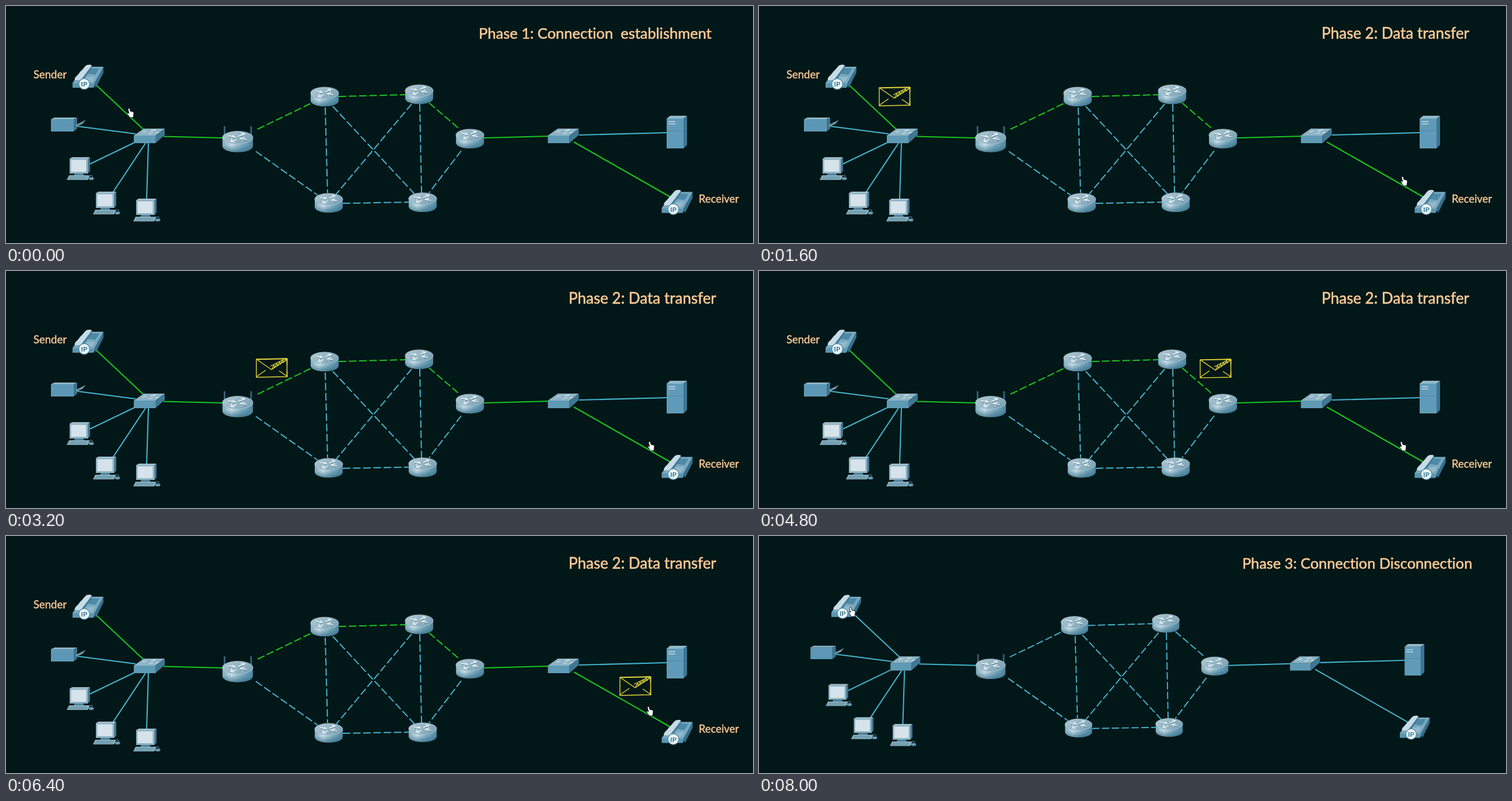
These frames come from a looping animation (1280x406 px, 8800 ms). An HTML page:

```html
<!DOCTYPE html>
<html lang="en">
<head>
<meta charset="utf-8">
<title>Connection phases</title>
<style>
  html, body { margin: 0; width: 100%; height: 100%; overflow: hidden; background: #021718; }
  svg { display: block; width: 100%; height: 100%; }
  text { font-family: Lato, "Open Sans", sans-serif; font-variant-ligatures: none; fill: #fbcb96; }
  #title, .label { stroke: #fbcb96; stroke-width: .6; }
  .label { stroke-width: .4; }
  .wire { stroke: #43b3cd; stroke-width: 2.1; fill: none; }
  .route { stroke: #18c51d; }
  .closed .route { stroke: #43b3cd; }
  .closed .label { display: none; }
  .dash { stroke-dasharray: 13 4.5; stroke-width: 2; }
  .badge { font-size: 12px; font-weight: 700; fill: #2e7796; text-anchor: middle; }
</style>
</head>
<body>
<svg viewBox="0 0 1280 406">
  <defs>
    <linearGradient id="metal">
      <stop offset="0" stop-color="#7ba9bc"/>
      <stop offset=".3" stop-color="#c9dde6"/>
      <stop offset=".65" stop-color="#78a9be"/>
      <stop offset="1" stop-color="#4f849e"/>
    </linearGradient>
    <linearGradient id="shade" x2="0" y2="1">
      <stop offset=".5" stop-color="#2f6a86" stop-opacity="0"/>
      <stop offset="1" stop-color="#2f6a86" stop-opacity=".75"/>
    </linearGradient>
    <linearGradient id="lid" x2="1" y2=".5">
      <stop offset="0" stop-color="#b3cad5"/>
      <stop offset="1" stop-color="#7fa5b7"/>
    </linearGradient>

    <g id="router">
      <path d="M-24-6V7C-24 20 24 20 24 7V-6Z" fill="url(#metal)"/>
      <path d="M-24-6V7C-24 20 24 20 24 7V-6Z" fill="url(#shade)"/>
      <ellipse cy="-6" rx="24" ry="10" fill="url(#lid)" stroke="#a9c5d1" stroke-width=".8"/>
      <g fill="none" stroke="#e6f0f3" stroke-width="1.4">
        <path d="M-15-9L-4-7M-8-10L-4-7L-11-5M14-3L4-5M8-1L4-5L11-7"/>
        <path d="M1-8L11-12M5-13L11-12L9-9M-2-3L-11 0M-5 1L-11 0L-9-4"/>
      </g>
      <path d="M-14-7L-4-5M4-3L14-1M2-6L12-10" stroke="#527f95" stroke-width=".9"/>
    </g>

    <g id="switch">
      <path d="M-27 0L-10-12H26L10 0Z" fill="#8eb4c5"/>
      <path d="M-27 0H10V13H-27Z" fill="#5f9ab5"/>
      <path d="M10 0L26-12V-1L10 13Z" fill="#3f7793"/>
      <path d="M-12-6L-5-8M-1-3L6-5M2-8L11-10M10-4L16-6" stroke="#dbe8ee" stroke-width="1.3"/>
    </g>

    <g id="phone">
      <path d="M114 132L128 111L167 105L154 132L150 140H114Z" fill="#5b96b2"/>
      <path d="M114 132L135 104L167 104L151 133Z" fill="#79a9bf"/>
      <path d="M151 133L167 104V114L154 140Z" fill="#376f8b"/>
      <path d="M139 116L147 107H160L153 118Z" fill="#4e89a6"/>
      <path d="M138 122L153 121L148 130H134Z" fill="#93b9ca"/>
      <path d="M118 127C117 123 120 121 123 118L136 103C139 100 145 100 147 102L143 110L128 127Z" fill="#c7dce6"/>
      <path d="M128 127L147 102V107L130 130Z" fill="#417b97"/>
      <circle cx="134" cy="133.500" r="9.300" fill="#f1f6f8" stroke="#5590aa" stroke-width="1.400"/>
      <text class="badge" x="134" y="138">IP</text>
    </g>

    <g id="pc">
      <path d="M109 262L113 259H144L140 262Z" fill="#a5c3d0"/>
      <path d="M140 262L144 259V283L140 287Z" fill="#3f7591"/>
      <rect x="109" y="261" width="31.500" height="26" fill="#8db2c3"/>
      <rect x="111.500" y="263.500" width="26" height="20.500" fill="#d6e3ea"/>
      <path d="M118 287H132L135 291H115Z" fill="#4d829b"/>
      <path d="M108 290H144L140 298H104Z" fill="#8bb0c0"/>
      <path d="M109 293H139M107 296H138" stroke="#4d8099" stroke-width="1"/>
      <path d="M141 291Q150 288 148 293" fill="none" stroke="#5e93ab"/>
      <ellipse cx="146" cy="295.500" rx="4.500" ry="2.600" fill="#6799af"/>
    </g>

    <g id="mail" fill="none" stroke="#e2d63c" stroke-width="1.4" stroke-linejoin="round">
      <path d="M-26-15L26-16L27 15L-26 16ZM-25-14.500L27-15.500L26 16"/>
      <path d="M-26-15L0 3L27-15M-26 15L-10 4M26 14L13 5"/>
      <path d="M-2-3L22-15M0 3L4-5L5 0L9-8L10-3L14-11L15-6L19-14L20-9L25-15" stroke-width="1.200"/>
    </g>
  </defs>

  <rect width="1280" height="406" fill="#021718"/>
  <g id="net">
    <g id="wires"></g>
    <path d="M374.500 206V226M420 206V226" stroke="#35657c" stroke-width="2.800"/>
    <use href="#router" transform="translate(397 232) scale(1.09)"/>
    <g id="parts"></g>

    <path d="M77 194L83 191H122L116 194Z" fill="#8db3c5"/>
    <path d="M77 194H116V215H77Z" fill="#5c98b5"/>
    <path d="M116 194L122 191V210L116 215Z" fill="#3c728e"/>
    <path d="M119 204L137 195L131 202L121 206Z" fill="#7599a8"/>

    <path d="M1132 193L1138 188H1167L1161 193Z" fill="#92b8c9"/>
    <path d="M1132 193H1161V244H1132Z" fill="#5f9bb8"/>
    <path d="M1161 193L1167 188V238L1161 244Z" fill="#3d7591"/>
    <path d="M1135 198H1147M1135 202H1147" stroke="#c3d9e3" stroke-width="1.400"/>
    <path d="M1132 214H1161" stroke="#4d88a4"/>

    <text class="label" x="47" y="124" font-size="18.500">Sender</text>
    <text class="label" x="1187" y="337" font-size="18.400">Receiver</text>
  </g>
  <text id="title" y="56"></text>
  <use id="letter" href="#mail"/>
  <path id="hand" d="M-2-8C-4-8-4-6-3.500-4L-2 1L-4 0C-6 0-5 2-4 3L-1 8H5L6 1C6-2 4-2 3-2L0-3L-1-7Q-1-8-2-8Z"
        fill="#fff" stroke="#071012" stroke-width=".9"/>
</svg>
<script>
const $ = id => document.getElementById(id);
const STEP = 800;

const wires = {
  "wire route": "M153 134L235 211M270 223.500L372 226M819 226L930 223M973 233L1138 327",
  "wire": "M122 206L222 219M143 271L222 233M182 321L239 235M241 330L244 235M982 221L1132 217",
  "wire route dash": "M431 211L522 167M570 155L684 152M725 166L776 210",
  "wire dash": "M428 249L534 324M547 174L551 320M560 172L700 322M695 168L566 322" +
               "M709 168L712 320M577 338L690 336M780 248L725 320"
};
$("wires").innerHTML = Object.entries(wires)
  .map(([kind, d]) => `<path class="${kind}" d="${d}"/>`).join("");

const parts = {
  router: [[546, 155], [708, 151], [553, 337], [714, 336], [795, 227]],
  switch: [[246, 222], [955.5, 222]],
  phone: [[0, 0], [1009.5, 214.5]],
  pc: [[0, 0], [45, 59], [114, 71]]
};
$("parts").innerHTML = Object.entries(parts).map(([id, spots]) =>
  spots.map(([x, y]) => `<use href="#${id}" x="${x}" y="${y}"/>`).join("")).join("");

const titles = [
  { text: "Phase 1: Connection\u00a0 establishment", x: 810, size: 25.5 },
  { text: "Phase 2: Data transfer", x: 964, size: 26 },
  { text: "Phase 3: Connection Disconnection", x: 828, size: 25.3 }
];

// One row per step: title, hand position, letter position
const steps = [
  [0, [213, 183]],
  [1, [1105, 300]],
  [1, [1105, 300], [232, 155]],
  [1, [1105, 300], [341, 194]],
  [1, [1105, 300], [455, 166]],
  [1, [1105, 300], [620, 126]],
  [1, [1103, 300], [782, 167]],
  [1, [1103, 300], [930, 191]],
  [1, [1103, 300], [1078, 257]],
  [1, [1130, 355], [1148, 378]],
  [2, [159, 130]]
];

function place(el, pos) {
  el.style.display = pos ? "" : "none";
  if (pos) el.setAttribute("transform", `translate(${pos})`);
}

function show([phase, hand, letter]) {
  const { text, x, size } = titles[phase];
  const closed = phase === 2;
  const title = $("title");
  title.textContent = text;
  title.setAttribute("x", x);
  title.setAttribute("font-size", size);
  $("net").setAttribute("class", closed ? "closed" : "");
  $("net").setAttribute("transform", closed ? "matrix(.965 0 0 .965 13.9 3.6)" : "");
  place($("hand"), hand);
  place($("letter"), letter);
}

const start = performance.now();
let current = -1;
function tick() {
  const i = Math.floor((performance.now() - start) / STEP) % steps.length;
  if (i !== current) show(steps[current = i]);
  requestAnimationFrame(tick);
}
tick();
</script>
</body>
</html>
```
